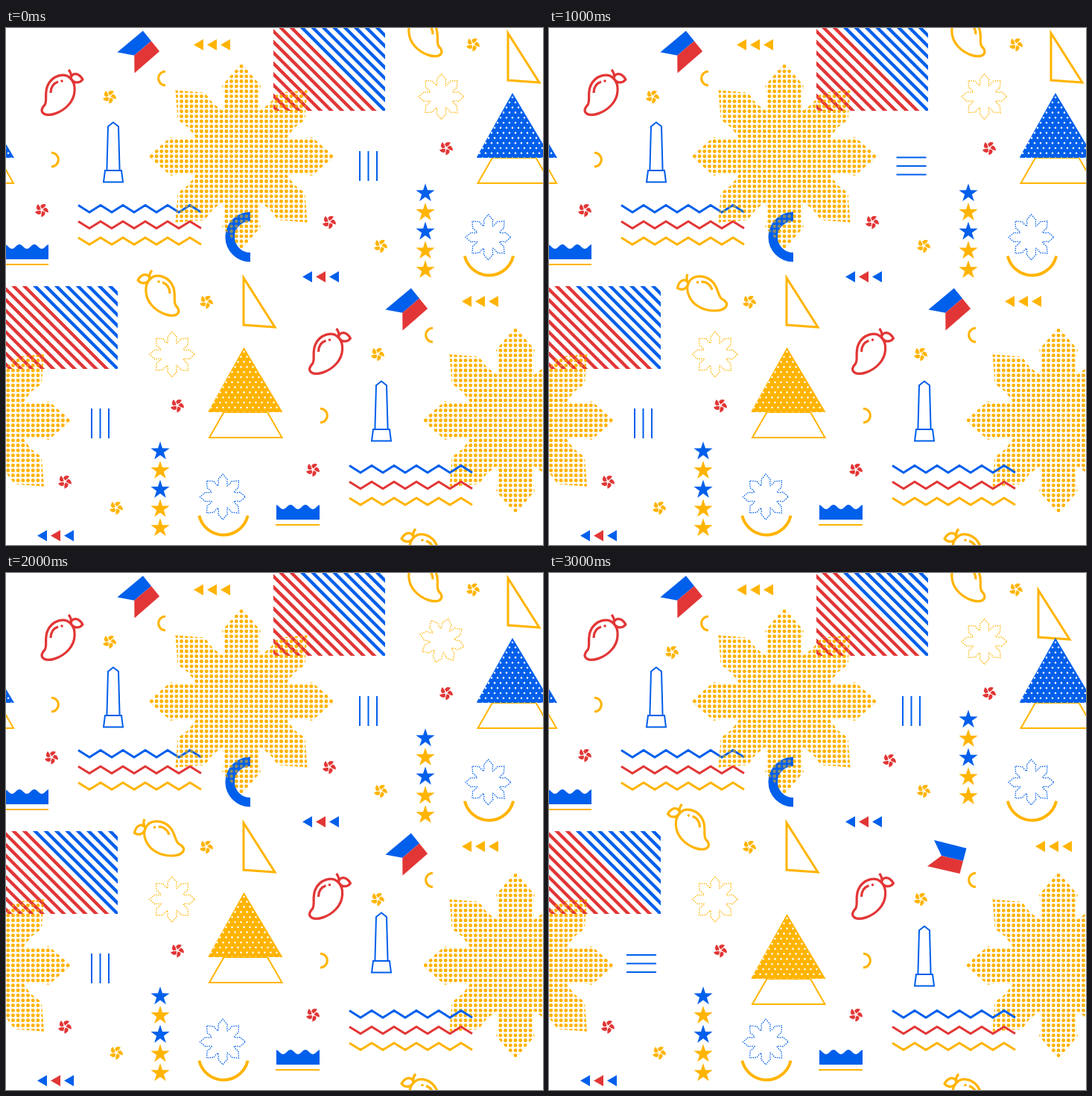
An HTML page with a canvas that plays this animation: 721 by 693 pixels, repeating every 3500 ms.

```html
<!DOCTYPE html>
<html lang="en">
<head>
<meta charset="utf-8">
<title>Festive pattern</title>
<style>
  html, body { margin: 0; width: 100%; height: 100%; overflow: hidden; background: #fff; }
  canvas { display: block; }
</style>
</head>
<body>
<canvas id="stage" width="721" height="693"></canvas>
<script>
const ctx = document.getElementById('stage').getContext('2d');
const BLUE = '#005feb', RED = '#e23636', GOLD = '#ffb400';
const STEP_MS = 500, STEPS = 7;
const rad = deg => deg * Math.PI / 180;

// Draws in a local frame placed at x, y and turned by deg.
function at(x, y, deg, draw) {
  ctx.save();
  ctx.translate(x, y);
  ctx.rotate(rad(deg));
  draw();
  ctx.restore();
}

function trace(points, closed = true) {
  ctx.beginPath();
  points.forEach(([x, y]) => ctx.lineTo(x, y));
  if (closed) ctx.closePath();
}

function fill(color, points) {
  trace(points);
  ctx.fillStyle = color;
  ctx.fill();
}

function line(color, width, points, closed = false) {
  trace(points, closed);
  stroke(color, width);
}

function stroke(color, width) {
  ctx.strokeStyle = color;
  ctx.lineWidth = width;
  ctx.stroke();
}

function arc(x, y, r, from, to, color, width) {
  ctx.beginPath();
  ctx.arc(x, y, r, from, to);
  stroke(color, width);
}

// Eight arrow-headed arms with deep slots between them.
function flakePoints(r) {
  const points = [];
  const valley = [Math.cos(Math.PI / 8) * 0.53, Math.sin(Math.PI / 8) * 0.53];
  const arm = [[0.62, -0.185], [0.76, -0.205], [1, 0], [0.76, 0.205], [0.62, 0.185], valley];
  for (let i = 0; i < 8; i++) {
    const c = Math.cos(i * Math.PI / 4), s = Math.sin(i * Math.PI / 4);
    for (const [u, v] of arm) points.push([r * (u * c - v * s), r * (u * s + v * c)]);
  }
  return points;
}

function dottedFlake(x, y, alpha = 1) {
  const gap = 6.7;
  at(x, y, 0, () => {
    trace(flakePoints(125));
    ctx.clip();
    ctx.beginPath();
    for (let i = -19; i <= 19; i++)
      for (let j = -19; j <= 19; j++) {
        ctx.moveTo(i * gap + 2.4, j * gap);
        ctx.arc(i * gap, j * gap, 2.4, 0, 7);
      }
    ctx.globalAlpha = alpha;
    ctx.fillStyle = GOLD;
    ctx.fill();
  });
}

function smallFlake(x, y, color, deg = 0) {
  at(x, y, deg, () => {
    ctx.setLineDash([1.5, 1.4]);
    line(color, 1.3, flakePoints(30.5), true);
  });
}

function stripes(x, y) {
  const w = 150, h = 111;
  at(x, y, 0, () => {
    ctx.beginPath();
    ctx.rect(0, 0, w, h);
    ctx.clip();
    for (let k = -11; k <= 7; k++) {
      const start = 39 + k * 14.4;
      line(k < 0 ? RED : BLUE, 4.3, [[start - 10, -10], [start + h + 10, h + 10]]);
    }
  });
}

const mangoBody = new Path2D(
  'M11-20C20-12 19 5 9 16C-1 27-17 32-24 28C-29 25-27 20-23 16C-19 10-24 1-19-10C-13-23 3-28 11-20Z' +
  'M12-20C13-25 12-28 9-31M12-20C14-28 23-27 28-18C23-12 15-13 12-20Z' +
  'M-15 0C-15-8-11-13-5-15');

function mango(x, y, color, deg = 0, flip = 1) {
  at(x, y, deg, () => {
    ctx.scale(flip, 1);
    ctx.strokeStyle = color;
    ctx.lineWidth = 3.2;
    ctx.lineJoin = 'round';
    ctx.stroke(mangoBody);
    ctx.beginPath();
    ctx.arc(0, -16, 1.8, 0, 7);
    ctx.fillStyle = color;
    ctx.fill();
  });
}

function flower(x, y, color) {
  for (let i = 0; i < 5; i++)
    at(x, y, 10 + i * 72, () => {
      ctx.beginPath();
      ctx.moveTo(0, -1.4);
      ctx.lineTo(-2.7, -4.5);
      ctx.quadraticCurveTo(-1.6, -9.4, 4.6, -8.2);
      ctx.quadraticCurveTo(3.4, -3.8, 0, -1.4);
      ctx.fillStyle = color;
      ctx.fill();
    });
}

function star(x, y, color) {
  const points = [];
  for (let i = 0; i < 10; i++) {
    const a = rad(i * 36 - 90), r = i % 2 ? 5.1 : 13.3;
    points.push([x + r * Math.cos(a), y + r * Math.sin(a)]);
  }
  fill(color, points);
}

function starColumn(x, y) {
  [BLUE, GOLD, BLUE, GOLD, GOLD].forEach((c, i) => star(x, y + i * 25.7, c));
}

function arrows(x, y, ends, middle) {
  [ends, middle, ends].forEach((c, i) => {
    const left = x + i * 18;
    fill(c, [[left, y], [left + 13, y - 7.5], [left + 13, y + 7.5]]);
  });
}

function zigzags(x, y) {
  [BLUE, RED, GOLD].forEach((c, row) => {
    const points = [];
    for (let i = 0; i < 12; i++) points.push([x + i * 15, y + row * 21.7 + (i % 2 ? 9.4 : 0)]);
    line(c, 3, points);
  });
}

function bars(x, y, deg = 0) {
  at(x, y, deg, () => {
    for (const dx of [-11.5, 0, 11.5]) line(BLUE, 2, [[dx, -20], [dx, 20]]);
  });
}

function obelisk(x, y) {
  at(x, y, 0, () => {
    line(BLUE, 2, [[0, 0], [7, 5.5], [8.6, 64.5], [-8.6, 64.5], [-7, 5.5]], true);
    line(BLUE, 2, [[-11, 64.5], [11, 64.5], [13, 80], [-13, 80]], true);
  });
}

function dottedTriangle(x, y, color) {
  at(x, y, 0, () => {
    line(GOLD, 2, [[-27, 87], [-46.5, 121], [51, 121], [31.5, 87]], true);
    const shape = [[0, 0], [52, 87], [-48.5, 87]];
    fill(color, shape);
    trace(shape);
    ctx.clip();
    ctx.beginPath();
    for (let row = 0; row < 13; row++)
      for (let col = -7; col <= 7; col++) {
        const dx = col * 8 + (row % 2 ? 4 : 0), dy = 6 + row * 6.8;
        ctx.moveTo(dx + 1.3, dy);
        ctx.arc(dx, dy, 1.3, 0, 7);
      }
    ctx.fillStyle = '#fff';
    ctx.fill();
  });
}

function setSquare(x, y) {
  line(GOLD, 3, [[x, y], [x, y + 63], [x + 42, y + 66]], true);
}

function water(x, y) {
  const points = [[x + 58, y + 20], [x, y + 20]];
  for (let dx = 0; dx <= 58; dx++)
    points.push([x + dx, y + 3 - 3 * Math.cos((dx - 19) * Math.PI / 10)]);
  fill(BLUE, points);
  line(GOLD, 2, [[x - 1, y + 27], [x + 58, y + 27]]);
}

function smile(x, y, deg = 0) {
  at(x, y, deg, () => {
    smallFlake(-1, -17.5, BLUE);
    arc(0, 0, 33.5, 0.23, Math.PI - 0.23, GOLD, 4);
  });
}

function flag(x, y, deg) {
  at(x, y, deg, () => {
    fill(BLUE, [[-39, -28], [4.5, -17], [0, 0], [-29, -7]]);
    fill(RED, [[-29, -7], [0, 0], [-4.5, 17], [-48, 7]]);
  });
}

function crescents() {
  const left = [Math.PI / 2, Math.PI * 1.5], right = [-Math.PI / 2, Math.PI / 2];
  arc(214, 67.5, 9.3, ...left, GOLD, 3);
  arc(573, 411.5, 9.3, ...left, GOLD, 3);
  arc(61, 176.5, 9.3, ...right, GOLD, 3);
  arc(422, 519.5, 9.3, ...right, GOLD, 3);
}

function draw(step) {
  const on = (n, active, rest = 0) => step === n ? active : rest;
  const tilt = step === 2 || step === 4 ? -20 : 0;

  ctx.fillStyle = '#fff';
  ctx.fillRect(0, 0, 721, 693);

  const flakes = [[316, 172], [684, 526], [-37.5, 526]];
  for (const [x, y] of flakes) dottedFlake(x, y);
  stripes(359, 0);
  stripes(0, 346);
  arc(328, 280, 27.3, Math.PI / 2, Math.PI * 1.5, BLUE, 12.5);
  zigzags(97, 237.5);
  // Dots show faintly through whatever overlaps them.
  for (const [x, y] of flakes) dottedFlake(x, y, 0.5);
  zigzags(461, 586.5);

  flag(195, 17.5, -54);
  flag(555 + on(6, 1), 362.5 + on(6, 23.5), on(6, 0, -54));

  arrows(on(3, 233, 252), 22.5, GOLD, GOLD);
  arrows(on(3, 592, on(6, 653, 612)), 366.5, GOLD, GOLD);
  arrows(on(3, 380, 398), 333.5, BLUE, RED);
  arrows(42, 680.5, BLUE, RED);

  mango(75, 87, RED, on(1, 10.5));
  mango(434.5, 434, RED, on(1, -16.5));
  mango(205 + on(6, -17.5), 356 + on(6, -15), GOLD, tilt, -1);
  mango(558, 8.5, GOLD, 0, -1);
  mango(559, 702.5, GOLD, 0, -1);

  crescents();

  flower(139 + on(6, 26), 92 + on(6, 14), GOLD);
  flower(48 + on(4, 13), 244 + on(4, 3), RED);
  flower(434 + on(6, 23), 260 + on(6, -9), RED);
  flower(148 + on(5, 3), 643 + on(5, -28), GOLD);
  for (const [x, y] of [[503, 292], [627, 22], [269, 367], [499, 437]]) flower(x, y, GOLD);
  for (const [x, y] of [[591, 161], [230, 506], [79, 608], [412, 592]]) flower(x, y, RED);

  obelisk(144, 126.5);
  obelisk(504, 473.5 + on(4, -18));

  bars(486.5 + on(5, -6), 185 + on(5, -9), on(2, 90));
  bars(126.5 + on(6, -2.5), 530 + on(6, -6.5), on(6, 90));

  starColumn(563, 221.5 + on(6, -25));
  starColumn(207, 567.5);

  smallFlake(584.5 + on(4, 1), 92 + on(4, -1.5), GOLD, on(4, 16));
  smallFlake(223, 437.5, GOLD);
  smile(648.5, 298);
  smile(292 + on(5, 4), 646 + on(5, 0.5), on(5, -32));

  setSquare(674 + on(6, -17), 7 + on(6, 16));
  setSquare(319, 335);

  for (const x of [680, -41]) dottedTriangle(x, 87, BLUE);
  dottedTriangle(319.5, 428 + on(6, 29), GOLD);

  water(-1, 290);
  water(363 + on(5, 14), 639 + on(5, 1));
}

let shown = -1;
function tick() {
  const step = Math.floor(performance.now() / STEP_MS) % STEPS;
  if (step !== shown) draw(shown = step);
  requestAnimationFrame(tick);
}
tick();
</script>
</body>
</html>
```
